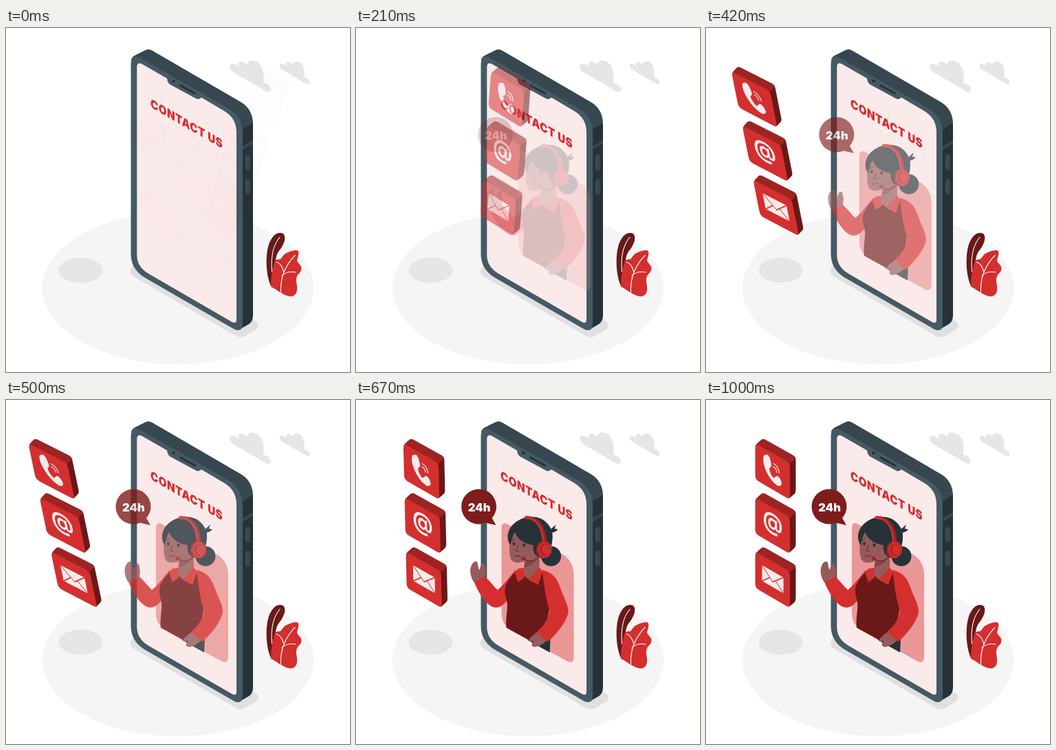
An HTML page that plays this animation: 500x500 px, repeating every 1.04 s.

```html
<!DOCTYPE html>
<html lang="en">
<head>
<meta charset="utf-8">
<title>Contact us</title>
<style>
  html, body { margin: 0; width: 100%; height: 100%; overflow: hidden; background: #fff; }
  svg { display: block; width: 100vw; height: 100vh; }
  text { font-family: Inter, "Open Sans", sans-serif; font-weight: 900; }
  .red { fill: #d32f2f; }
  .brick { fill: #9e2323; }
  .wine { fill: #6a1818; }
  .dark { fill: #263238; }
  .skin { fill: #955b5b; }
  .pale { fill: #fbeaea; }
  .line { fill: none; stroke-linecap: round; stroke-linejoin: round; }
</style>
</head>
<body>
<svg viewBox="0 0 500 500">
  <defs>
    <path id="cloud" d="M326 53C324 57 326 61 330 64L378 92C384 95 387 90 384 86C382 82 378 81 374 79C376 66 373 51 362 48C355 46 351 49 350 54C348 49 342 47 338 51C337 53 338 55 339 57C334 52 328 51 326 53Z"/>
    <g id="tile">
      <path class="wine" d="M118 90L128 82Q130.500 83 130.500 88V131Q130.500 135 128 137L121 143Z"/>
      <path class="brick" d="M72 66Q73 64 80 58Q83 55.500 87 58L127 80.500Q130 82 130.300 85L121.500 93L112 92Z"/>
      <path class="red" d="M71.500 70Q71.500 63 77 66L117 89Q122 92 122 98V139Q122 145 117 142L76 118Q71.500 115 71.500 109Z"/>
    </g>
  </defs>

  <!-- floor and scenery -->
  <ellipse cx="250" cy="378" rx="197" ry="111" fill="#f5f5f5"/>
  <ellipse cx="108.500" cy="352" rx="32" ry="18.500" fill="#e6e6e6"/>
  <g fill="#e6e6e6">
    <use href="#cloud"/>
    <use href="#cloud" transform="translate(160.300 13.800) scale(.73)"/>
    <path fill="#e0e0e0" d="M184 346Q177 355 185 361L335 448Q341 451 347 448L364 438Q370 433 364 427L350 418L200 340Z"/>
  </g>

  <!-- plant -->
  <path class="wine" d="M385 375C376 355 377 320 385 308C391 297 400 296 404 300C408 307 402 318 396 325C388 338 392 360 395 372Z"/>
  <path class="red" d="M385 376C385 360 388 348 390 341C391 335 396 337 399 336C402 333 403 329 408 327C413 325 419 322 424 323.500C427 326 424 333 423 338C424 342 430 345 429.500 350C429 356 424 357 423 361C420 367 424 373 423 381C422 389 416 392 408 389C400 386 393 380 385 376Z"/>
  <path class="line" stroke="#fff" stroke-width="1.100" d="M386.500 354C385 336 387 317 398 304M399.500 384C398.500 364 405 346 420 330.500M393 340C398 342 402 347 403.500 354M401 360C406 355 412 353.500 421 355"/>

  <!-- phone -->
  <path fill="#37474f" d="M182 46Q183 42 188 39.500L202 32.500Q207 29.500 212 32.500L342 108Q359 118.500 359 140L344 150Z"/>
  <path class="dark" d="M343 148L358.500 138Q359 139 359 142V418Q359 427 352 431L338 439Z"/>
  <path fill="#455a64" d="M181.500 54Q181.500 36 196 44L322 116Q344 129 344 152V429Q344 443 332 438L202 363Q181.500 351 181.500 328Z"/>
  <path class="pale" d="M190.300 57Q190.300 48.500 198 52.500L234 73.300Q235 81 240 83L277 103Q281 104 284 101L317 120.500Q335 131 335 152V423.500Q335 431 328 427L207 357Q190.300 347 190.300 330Z"/>
  <path class="line" stroke="#263238" stroke-width="3" d="M253.500 83.500L274.500 95"/>
  <circle class="dark" cx="243.500" cy="77" r="2.300"/>
  <path fill="#37474f" d="M344 172L359 163V168L344 177Z"/>
  <g id="keys">
    <rect x="348" y="184" width="7" height="23" rx="3.500" fill="#37474f"/>
    <path class="line" stroke="#455a64" d="M349 188V203"/>
  </g>
  <use href="#keys" y="35"/>
  <text class="red" font-size="17.500" letter-spacing=".5" transform="matrix(.866 .5 0 1 210 115)">CONTACT US</text>

  <!-- contact tiles -->
  <g id="tiles">
    <use href="#tile"/>
    <use href="#tile" y="78.700"/>
    <use href="#tile" y="157.500"/>
    <path class="pale" d="M85 80C83 81 82.500 88 84.500 95C88 108 96 119 103 124C106 126 110 125 110 121C109 116 106 110 103 110.500C101 110.500 100 114 98 113C95 110 92.500 105 92 100C91.500 98 95.500 98.500 95 95C94.500 88 92 80 89 79.500C87.500 79.200 86 79.500 85 80Z"/>
    <path class="line" stroke="#fbeaea" stroke-width="1.300" d="M98 97Q102 99 103 105M98 92.500Q105 96 106.500 106"/>
    <text class="pale" font-size="33" text-anchor="middle" style="font-weight:700" transform="matrix(.866 .5 0 1 97 189)">@</text>
    <g transform="matrix(.866 .5 0 1 97 260.500)">
      <rect class="pale" x="-18" y="-11.500" width="36" height="23"/>
      <path class="line" stroke="#d32f2f" stroke-width="1.300" d="M-18-11.500L0 4L18-11.500M-18 11.500L-5 0M18 11.500L5 0"/>
    </g>
  </g>

  <!-- operator -->
  <g id="agent">
    <path fill="#e99797" d="M212 187Q212 176 220 180L300 224Q317 234 317 255V373Q317 384 308 380L226 335Q212 326 212 310Z"/>
    <path class="dark" d="M250 340L284 340C282 352 283 360 282 367L250 349Z"/>
    <path class="skin" d="M172 265C167 258 165 247 168 241C170 236 174 233 177 236C178 241 178 245 180 247C181 241 184 235 187 239C190 247 189 254 187 260Z"/>
    <path class="red" d="M232 247C220 262 212 272 206 276C200 270 192 260 187 256C182 261 175 264 172 264C178 280 190 298 200 301C210 304 216 296 221 290L238 262Z"/>
    <path class="wine" d="M234 248C226 256 218 266 217 275C216 285 222 292 220 305C219 315 218 325 219 331L250 348C260 346 268 346 274 343C275 330 281 312 282 300C280 285 278 270 272 250L249 256Z"/>
    <path class="skin" d="M246 232L243 254L255 264L267 246V222Z"/>
    <path fill="#7c4849" d="M246 235Q256 236 264 228Q260 240 245 243Z"/>
    <path class="red" d="M244 244L236 245L231 251L236 265L245 258ZM266 243L272 249L265 269L250 260Q260 254 266 243Z"/>
    <path class="skin" d="M266 336C260 340 254 344 251 350C253 352 256 350 259 350C255 354 254 358 260 359C268 358 276 352 279 348Z"/>
    <path class="red" d="M271 247C290 252 294 262 300 280C306 294 309 300 309 308C307 322 292 340 280 351C275 349 268 342 264 336C274 328 280 318 282 306C276 290 274 270 271 247Z"/>

    <path class="skin" d="M224 200C223 215 223 226 226 232C230 238 240 237 246 234L266 228L262 200L232 188Z"/>
    <circle class="dark" cx="284" cy="227" r="14.500"/>
    <path class="dark" d="M280 191L291 181L289 187L294 188Q291 192 285 193L284 198Z"/>
    <path class="dark" d="M221 200C220 184 236 171 253 170C270 168 284 180 286 195C287 214 280 226 268 229C260 227 257 220 258 211C246 209 236 204 231 192C228 198 226 204 225 211C222 207 221 204 221 200Z"/>
    <ellipse class="dark" cx="230" cy="209" rx="2" ry="2.400"/>
    <ellipse class="dark" cx="244.500" cy="211" rx="2" ry="2.400"/>
    <path class="line" stroke="#263238" d="M226.500 204L231 202.500M243 205.500Q246 204.500 249 206.500"/>
    <path class="line" stroke="#6a1818" d="M236 211Q235 216 232.500 218.500Q234 220.500 237 219.500M231.500 226.500Q235 228 239 226"/>
    <path class="line" stroke="#9e2323" stroke-width="5" d="M248 171C264 171 275 185 275 208"/>
    <path class="line" stroke="#d32f2f" stroke-width="2.500" d="M246 171C261 170 272 184 272.500 208"/>
    <path class="line" stroke="#7f1c1c" stroke-width="1.300" d="M267 226C263 234 252 237 245 231"/>
    <ellipse class="brick" cx="243.500" cy="230" rx="3" ry="2.600"/>
    <ellipse class="brick" cx="272.500" cy="218" rx="10.500" ry="12.500"/>
    <ellipse class="red" cx="275" cy="217.500" rx="10" ry="11.500"/>
    <ellipse class="brick" cx="275.500" cy="217.500" rx="7.500" ry="9"/>
    <ellipse class="red" cx="276.500" cy="217.500" rx="6" ry="7.500"/>

    <path fill="#7f1c1c" d="M204.500 155A25.500 25.500 0 1 0 189 178.500L204 182L198 171.500A25.500 25.500 0 0 0 204.500 155Z"/>
    <text x="179.500" y="161.500" font-size="16.500" text-anchor="middle" fill="#fff">24h</text>
  </g>
</svg>
<script>
  const LOOP = 1040, FPS = 24, LEAD = 0.75, PIVOT_Y = 180;
  const tiles = document.getElementById('tiles');
  const agent = document.getElementById('agent');

  const mix = (a, b, p) => a + (b - a) * p;
  const clamp = v => Math.min(1, Math.max(0, v));
  const bezier = (a, b, s) => 3 * a * s * (1 - s) ** 2 + 3 * b * s * s * (1 - s) + s ** 3;

  // cubic-bezier(.36, -.01, .5, 1.38), solved by bisection
  function ease(x) {
    let lo = 0, hi = 1;
    for (let i = 0; i < 24; i++) {
      const mid = (lo + hi) / 2;
      if (bezier(0.36, 0.5, mid) < x) lo = mid; else hi = mid;
    }
    return bezier(-0.01, 1.38, hi);
  }

  // Tiles fly in from the right, lean over, then settle.
  function tilePose(x) {
    if (x < 0.6) {
      const p = ease(x / 0.6);
      return { shift: mix(250, 0, p), lean: mix(-0.364, 0.176, p), alpha: clamp(p) };
    }
    const lean = x < 0.8
      ? mix(0.176, -0.035, ease((x - 0.6) / 0.2))
      : mix(-0.035, 0, ease((x - 0.8) / 0.2));
    return { shift: 0, lean, alpha: 1 };
  }

  function draw() {
    const t = performance.now() % LOOP;
    const step = Math.floor((t + 3.4) * FPS / 1000);
    const x = clamp((step + LEAD) / FPS);

    const { shift, lean, alpha } = tilePose(x);
    tiles.setAttribute('transform', `matrix(1 0 ${lean} 1 ${shift - lean * PIVOT_Y} 0)`);
    tiles.setAttribute('opacity', alpha);

    const p = ease(x);
    agent.setAttribute('transform', `translate(${mix(30, 0, p)} 0)`);
    agent.setAttribute('opacity', clamp(p));
    requestAnimationFrame(draw);
  }
  draw();
</script>
</body>
</html>
```
